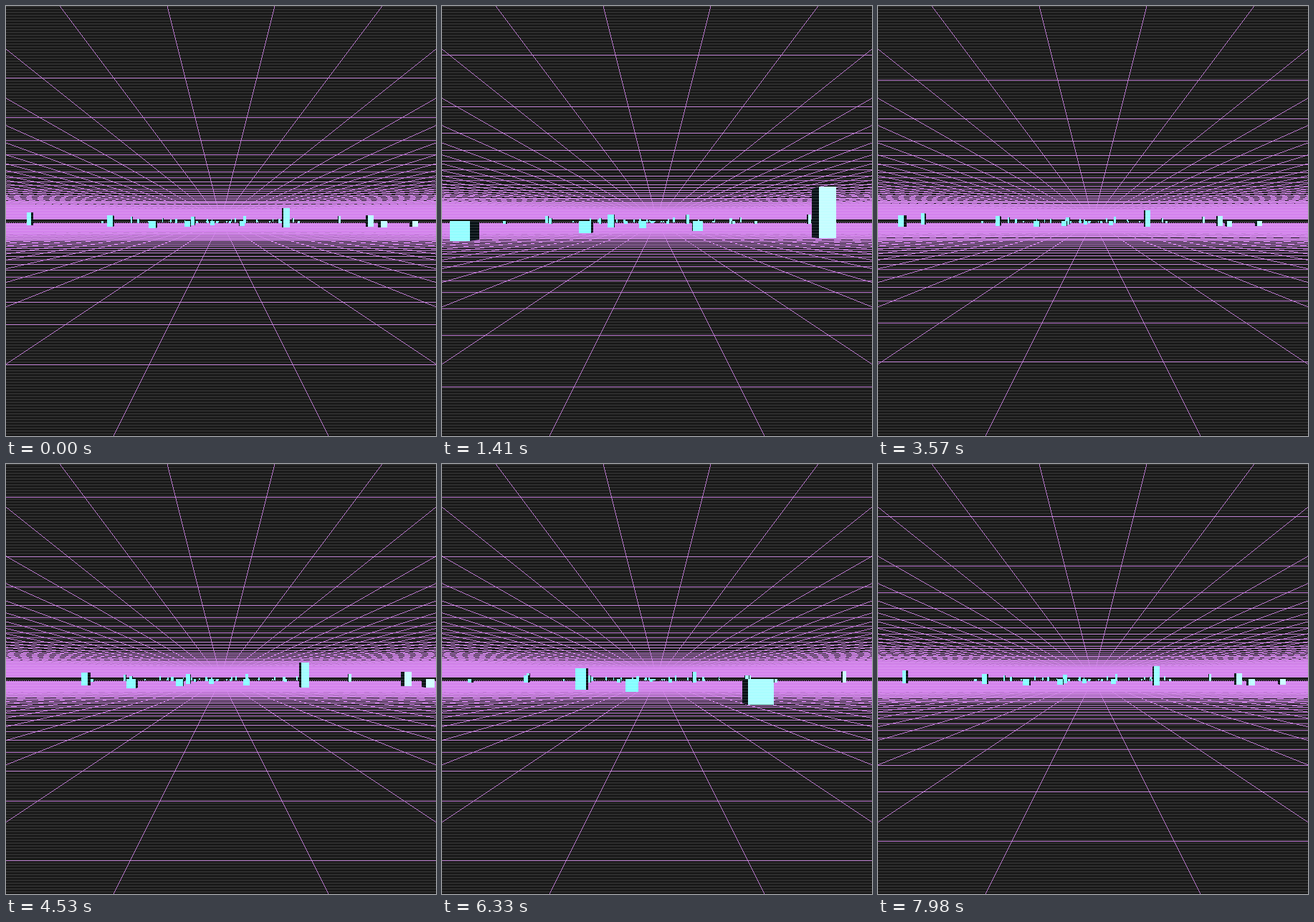
Animation of 600 by 600 pixels, one loop 8000 ms. Source, as an HTML page with a canvas:

```html
<!DOCTYPE html>
<html lang="en">
<head>
<meta charset="utf-8">
<title>Grid flight</title>
<style>
html, body { margin: 0; height: 100%; overflow: hidden; background: #161616; }
canvas { display: block; width: 600px; height: 600px; }
</style>
</head>
<body>
<canvas id="stage" width="600" height="600"></canvas>
<script>
const SIZE = 600, MID = 300;
const FOCAL = MID * Math.sqrt(3);
const HORIZON_GAP = 3;
const LOOP_MS = 8000, STEP_MS = 30;
const CUBE = 1.34, REPEAT = 134, FAR = 480;
const PURPLE = 'rgba(213,130,237,.84)';

// Each box: distance at the start, centre x, cubes above and below eye level.
// Distances are measured in animation steps; the set repeats in depth.
const boxes = [
  [76.3, 13.41, 2, 1], [117.3, -60.5, 2, 1], [91.5, -27.3, 1, 1],
  [72.1, -13.3, 0, 1], [88, -7.96, 0, 1], [77, 33.7, 0, 1],
  [90, 46.94, 0, 1], [85, 34.2, 1, 1], [75.1, 66.55, 2, 1],
  [75.1, -46.5, 1, 1], [75.8, -66.8, 0, 1], [96.4, 5.425, 0, 1],
  [122.87, -9.37, 1, 1], [116.14, -2.665, 0, 1]
];

const ctx = document.getElementById('stage').getContext('2d');
const mod = (a, b) => ((a % b) + b) % b;

function layer(paint) {
  const canvas = document.createElement('canvas');
  canvas.width = canvas.height = SIZE;
  paint(canvas.getContext('2d'));
  return canvas;
}

// One pixel-stepped line from the vanishing point; slope is dx per unit of dy.
function ray(c, slope, side) {
  const steep = slope < 1;
  for (let i = 0; i < MID; i++) {
    const run = i + 0.5;
    const dx = steep ? run * slope : run;
    const dy = steep ? run : run / slope;
    if (dy < HORIZON_GAP) continue;
    const rows = Math.ceil(dy);
    const y = side < 0 ? MID - rows : MID + rows - 1;
    c.fillRect(Math.floor(MID + dx), y, 1, 1);
    c.fillRect(Math.floor(MID - dx), y, 1, 1);
  }
}

const rays = layer(c => {
  c.fillStyle = PURPLE;
  for (let slope = 0.25; slope < 100; slope += 0.5) ray(c, slope, -1);
  for (let slope = 0.5; slope < 100; slope += 1) ray(c, slope, 1);
});

const scanlines = layer(c => {
  c.fillStyle = 'rgba(255,255,255,.1)';
  for (let y = 0; y < SIZE; y += 4) c.fillRect(0, y, SIZE, 2);
});

function drawCrossLines(step) {
  const offset = mod(FOCAL / 200 - step * 0.05, 1);
  ctx.fillStyle = PURPLE;
  for (let k = 1; k < 174; k++) {
    const dy = FOCAL / (k + offset);
    if (dy >= MID || dy < HORIZON_GAP) continue;
    for (const side of [-1, 1])
      ctx.fillRect(0, Math.floor(MID + side * dy + 0.02), SIZE, 1);
  }
}

function drawBox({ z, x, up, down }) {
  const project = (v, depth) => Math.round(MID + v * FOCAL / depth);
  const back = z + CUBE;
  const left = project(x - CUBE / 2, z), right = project(x + CUBE / 2, z);
  const top = project(-up * CUBE, z), bottom = project(down * CUBE, z);
  const inner = x - Math.sign(x) * CUBE / 2;
  const edge = x < 0 ? right : left;
  const backEdge = project(inner, back);

  ctx.fillStyle = '#050f13';
  ctx.beginPath();
  ctx.moveTo(edge, top);
  ctx.lineTo(backEdge, project(-up * CUBE, back));
  ctx.lineTo(backEdge, project(down * CUBE, back));
  ctx.lineTo(edge, bottom);
  ctx.fill();

  const across = Math.max(-1, Math.min(1, x * FOCAL / z / MID));
  const red = Math.round(128 + (across > 0 ? 85 : -20) * across);
  ctx.fillStyle = `rgb(${red},253,255)`;
  ctx.fillRect(left, top, Math.max(1, right - left), Math.max(1, bottom - top));
}

function drawBoxes(step) {
  const visible = [];
  for (const [start, x, up, down] of boxes)
    for (let z = mod(start - step, REPEAT); z < FAR; z += REPEAT)
      if (z > 0.7) visible.push({ z, x, up, down });
  visible.sort((a, b) => b.z - a.z).forEach(drawBox);
}

function render(now) {
  const step = Math.floor((now % LOOP_MS) / STEP_MS);
  ctx.fillStyle = '#161616';
  ctx.fillRect(0, 0, SIZE, SIZE);
  ctx.drawImage(rays, 0, 0);
  drawCrossLines(step);
  drawBoxes(step);
  ctx.drawImage(scanlines, 0, 0);
}

const startTime = performance.now();
function tick() {
  render(performance.now() - startTime);
  requestAnimationFrame(tick);
}
tick();
</script>
</body>
</html>
```
